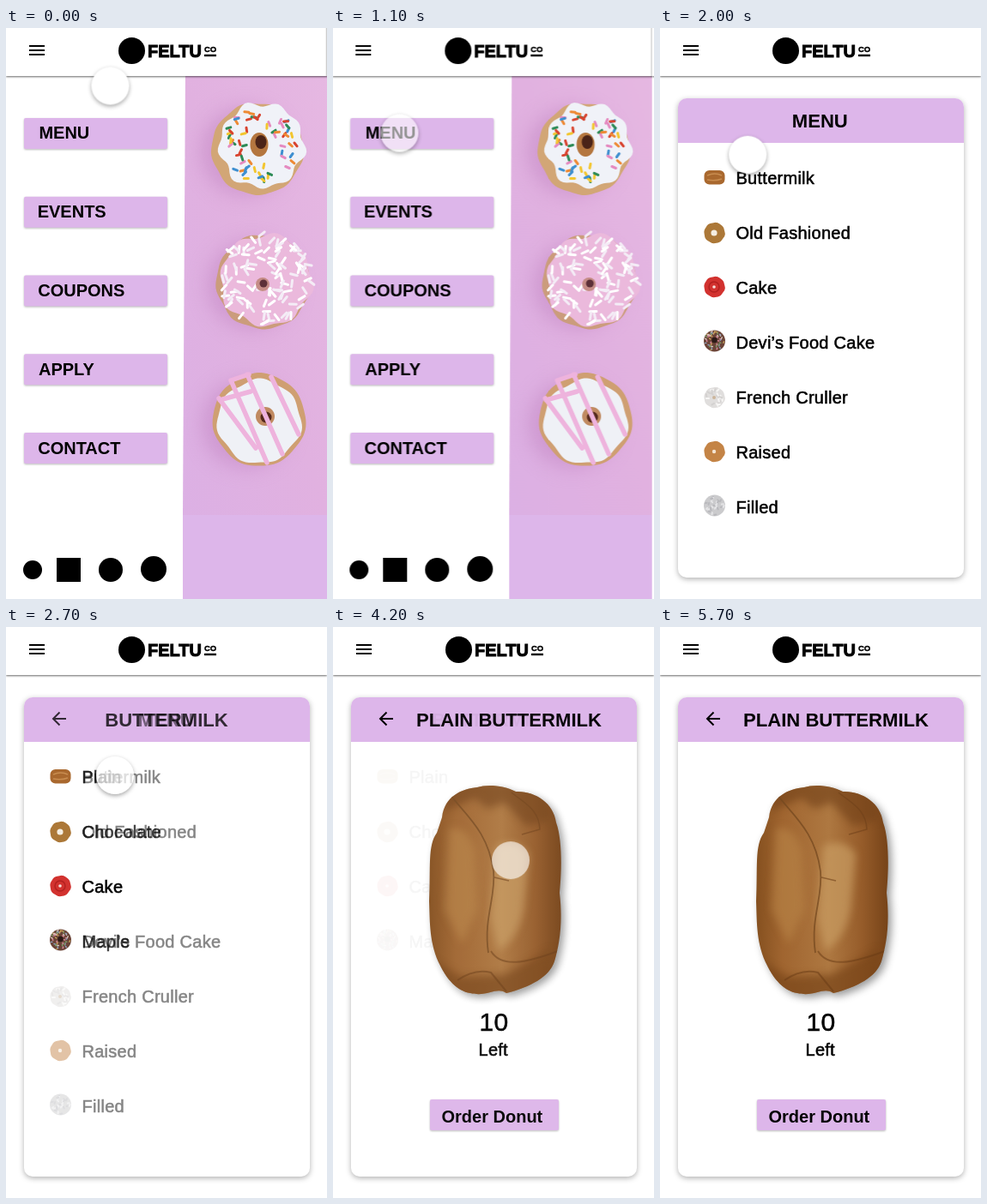
Animation, 374 px wide and 666 px high, one loop 5.8 s. Source, as an HTML page:

```html
<!DOCTYPE html>
<html lang="en">
<head>
<meta charset="utf-8">
<title>Donut ordering app</title>
<style>
  @property --fill { syntax: "<number>"; inherits: false; initial-value: 1; }
  @property --shade { syntax: "<number>"; inherits: false; initial-value: .35; }
  html, body { margin: 0; width: 100%; height: 100%; overflow: hidden; background: #fff; }
  svg { display: block; position: absolute; left: 0; top: 0; }
  text { font-family: "Liberation Sans", Arial, sans-serif; fill: #000; }
  .bold { font-weight: 700; font-size: 20px; }
  .title { font-weight: 700; font-size: 22.1px; text-anchor: middle; }
  .item { font-size: 20px; letter-spacing: .27px; stroke: #000; stroke-width: .55px; }
  .count { font-size: 30px; }
  .word { font-weight: 700; font-size: 20px; stroke: #000; stroke-width: .9px; }
  .co { font-weight: 700; font-size: 9.5px; stroke: #000; stroke-width: .4px; }
  .bar { filter: drop-shadow(0 1px 1px rgba(0, 0, 0, .6)); }
  .button { fill: #ddb6ea; filter: drop-shadow(0 1.5px 1px rgba(0, 0, 0, .28)); }
  .card { filter: drop-shadow(0 2px 3px rgba(0, 0, 0, .3)); }
  .soft { filter: blur(5px); }
  .haze { filter: blur(11px); }
  .cast { filter: drop-shadow(4px 4px 5px rgba(0, 0, 0, .4)); }

  #home, #app, #dim, #menu, #kind, #back, #rows, #detail {
    animation: 5800ms infinite both;
    animation-timing-function: cubic-bezier(.15, .25, 0, 1);
    /* critically damped spring */
    animation-timing-function: linear(0, .007 1.25%, .0265 2.5%, .0902 5%, .264 10%, .442 15%,
      .594 20%, .713 25%, .801 30%, .864 35%, .908 40%, .939 45%, .96 50%, .983 60%, .993 70%,
      .997 80%, 1 100%);
  }
  #home { animation-name: leave; }
  #app { animation-name: enter; }
  #dim { animation-name: dim; }
  #menu { animation-name: menu; }
  #kind { animation-name: kind; }
  #back { animation-name: back; }
  #rows { animation-name: rows; }
  #detail { animation-name: detail; }
  @keyframes leave {
    0%, 18.83% { transform: translateX(0); }
    32.62%, 100% { transform: translateX(-112.2px); }
  }
  @keyframes enter {
    0%, 18.83% { transform: translateX(374px); }
    32.62%, 100% { transform: translateX(0); }
  }
  @keyframes dim {
    0%, 18.83% { opacity: 0; }
    32.62%, 100% { opacity: .27; }
  }
  @keyframes menu {
    0%, 44.14% { opacity: 1; }
    57.93%, 100% { opacity: 0; }
  }
  @keyframes kind {
    0%, 44.14% { opacity: 0; }
    52.76%, 65.43% { opacity: 1; }
    79.22%, 100% { opacity: 0; }
  }
  @keyframes back {
    0%, 44.14% { opacity: 0; }
    52.76%, 100% { opacity: 1; }
  }
  @keyframes rows {
    0%, 65.43% { opacity: 1; }
    79.22%, 100% { opacity: 0; }
  }
  @keyframes detail {
    0%, 65.43% { opacity: 0; }
    79.22%, 100% { opacity: 1; }
  }

  #cursor {
    position: absolute; left: -22px; top: -22px; width: 44px; height: 44px; border-radius: 50%;
    background: rgba(255, 255, 255, var(--fill));
    box-shadow: 0 2px 5px rgba(0, 0, 0, var(--shade));
    animation: move 5800ms linear infinite both, press 5800ms linear infinite both;
  }
  @keyframes move {
    0%, 2% { transform: translate(121.5px, 67.5px); animation-timing-function: ease-in-out; }
    16%, 28% { transform: translate(77.5px, 122.5px); animation-timing-function: ease-in-out; }
    41%, 47% { transform: translate(127px, 173px); animation-timing-function: ease-in-out; }
    54%, 56% { transform: translate(106px, 182px); animation-timing-function: ease-in; }
    60.3% { transform: translate(123.5px, 179px); }
    65.5% { transform: translate(173px, 217px); }
    72.4% { transform: translate(207px, 272px); animation-timing-function: ease-out; }
    77%, 100% { transform: translate(211px, 279px); }
  }
  @keyframes press {
    0%, 15% { --fill: 1; --shade: .35; }
    18.4%, 24% { --fill: .58; --shade: .33; }
    28%, 41% { --fill: 1; --shade: .35; }
    44% { --fill: .6; --shade: .35; }
    46.5% { --fill: .72; --shade: .35; }
    50% { --fill: 1; --shade: .35; }
    56% { --fill: .9; --shade: .35; }
    60% { --fill: .55; --shade: .35; }
    65% { --fill: .55; --shade: .2; }
    72.4% { --fill: .62; --shade: 0; }
    78%, 100% { --fill: 0; --shade: 0; }
  }
</style>
</head>
<body>
<svg width="374" height="666" viewBox="0 0 374 666">
  <defs>
    <linearGradient id="pink" x1="1" y1="0" x2="0" y2="1">
      <stop offset="0" stop-color="#e6b8e2"/>
      <stop offset=".5" stop-color="#e1b1e0"/>
      <stop offset="1" stop-color="#dcb0e4"/>
    </linearGradient>
    <linearGradient id="crust" x1="0" x2="1">
      <stop offset="0" stop-color="#85501f"/>
      <stop offset=".2" stop-color="#a06530"/>
      <stop offset=".55" stop-color="#ae7841"/>
      <stop offset=".8" stop-color="#965c2a"/>
      <stop offset="1" stop-color="#764318"/>
    </linearGradient>
    <clipPath id="loaf"><use href="#loafShape"/></clipPath>
    <clipPath id="panel"><path id="panelShape" d="M209 50H374V568H206Z"/></clipPath>
    <g id="header">
      <rect class="bar" y="-5" width="374" height="61" fill="#fff"/>
      <path d="M27 21h18M27 26h18M27 31h18" stroke="#000" stroke-width="2"/>
      <circle cx="146.5" cy="26.5" r="15.5"/>
      <text class="word" x="165" y="33.5">FELTU</text>
      <text class="co" x="231" y="28">CO</text>
      <path d="M231 32h14" stroke="#000" stroke-width="2.4"/>
    </g>
  </defs>

  <g id="home">
    <rect width="374" height="666" fill="#fff"/>
    <path d="M206 560H374V666H206Z" fill="#ddb6ea"/>
    <use href="#panelShape" fill="url(#pink)"/>
    <g id="photo" clip-path="url(#panel)"></g>
    <g id="links"></g>
    <circle cx="31" cy="632" r="11"/>
    <rect x="59" y="618" width="28" height="28"/>
    <circle cx="122" cy="632" r="14"/>
    <circle cx="172" cy="631" r="15"/>
    <use href="#header"/>
    <rect id="dim" width="374" height="666"/>
  </g>

  <g id="app">
    <rect width="374" height="666" fill="#fff"/>
    <use href="#header"/>
    <g class="card">
      <rect x="21" y="82" width="333" height="559" rx="10" fill="#fff"/>
      <path d="M21 134V92a10 10 0 0 1 10-10H344a10 10 0 0 1 10 10V134Z" fill="#ddb6ea"/>
    </g>
    <path id="back" d="M70 107H55.500M62.500 99.500L55 107l7.500 7.500" fill="none" stroke="#000" stroke-width="2"/>
    <g id="rows"></g>
    <g id="menu"></g>
    <g id="kind"></g>
    <g id="detail">
      <text class="title" x="205" y="116">PLAIN BUTTERMILK</text>
      <path id="loafShape" class="cast" fill="url(#crust)" d="M127 222C130 197 150 189 168 187C180 183 200 185 213 192
        C235 191 257 205 260 228C268 250 266 290 264 310C268 345 264 370 258 390C252 408 230 420 202 427
        C190 419 180 432 160 427C145 425 132 410 125 395C112 370 113 345 112 320C114 280 110 255 121 240Z"/>
      <g clip-path="url(#loaf)">
        <path class="soft" d="M125 180H250L255 225L225 232L200 205L180 212L165 200L130 215Z" fill="#74431a" opacity=".65"/>
        <path class="soft" d="M110 385L150 408L200 405L255 375L265 440H110Z" fill="#784519" opacity=".7"/>
        <path class="soft" d="M190 255Q215 245 228 265L222 330Q215 365 192 378L183 340Z" fill="#c99d63" opacity=".7"/>
        <path class="soft" d="M135 235Q155 230 165 260L168 330L150 370L130 330Z" fill="#b98548" opacity=".6"/>
        <path d="M137 196C153 218 181 238 187 285C190 315 175 340 181 380" fill="none" stroke="#74481f" stroke-width="1.8" opacity=".75"/>
        <path d="M188 292L205 296M208 193C222 205 240 212 241 236L220 242" fill="none" stroke="#704119" stroke-width="1.6" opacity=".6"/>
        <path d="M184 378C196 398 225 392 262 378M145 412Q165 398 184 403L202 425" fill="none" stroke="#693b15" stroke-width="2" opacity=".5"/>
      </g>
      <text class="item count" x="187.500" y="471" text-anchor="middle">10</text>
      <text class="item" x="169.500" y="500">Left</text>
      <rect class="button" x="113" y="551" width="150" height="36" rx="2"/>
      <text class="bold" x="126.500" y="578">Order Donut</text>
    </g>
  </g>
</svg>
<div id="cursor"></div>

<script>
  const put = (id, ...parts) => document.getElementById(id).innerHTML = parts.flat().join("");
  const text = (cls, x, y, s) => `<text class="${cls}" x="${x}" y="${y}">${s}</text>`;
  const disc = (x, y, r, fill) => `<circle cx="${x}" cy="${y}" r="${r}" fill="${fill}"/>`;
  const oval = (x, y, rx, ry, fill) => `<ellipse cx="${x}" cy="${y}" rx="${rx}" ry="${ry}" fill="${fill}"/>`;
  const times = (n, make) => Array.from({ length: n }, (_, i) => make(i));

  let seed = 7;
  const rnd = () => (seed = seed * 16807 % 2147483647) / 2147483647;

  // Round shape with a wavy rim
  function blob(cx, cy, r, wave, lobes, fill) {
    const points = times(90, i => {
      const a = i * Math.PI / 45;
      const d = r + wave * (Math.sin(lobes * a) + .5 * Math.sin((lobes - 3) * a + 1));
      return (cx + d * Math.cos(a)).toFixed(1) + "," + (cy + d * Math.sin(a)).toFixed(1);
    });
    return `<polygon points="${points.join(" ")}" fill="${fill}"/>`;
  }

  // Short strokes scattered over a ring
  function strew(n, cx, cy, inner, outer, len, width, colors) {
    return times(n, i => {
      const a = rnd() * 2 * Math.PI, d = Math.sqrt(inner ** 2 + rnd() * (outer ** 2 - inner ** 2));
      const b = rnd() * Math.PI, dx = len * Math.cos(b), dy = len * Math.sin(b);
      const x = cx + d * Math.cos(a) - dx / 2, y = cy + d * Math.sin(a) - dy / 2;
      return `<path d="M${x.toFixed(1)} ${y.toFixed(1)}l${dx.toFixed(1)} ${dy.toFixed(1)}"
        stroke="${colors[i % colors.length]}" stroke-width="${width}" stroke-linecap="round"/>`;
    });
  }

  const shadow = (x, y) => `<circle class="haze" cx="${x}" cy="${y}" r="52" fill="#c083c0" opacity=".5"/>`;
  const candy = ["#d8432f", "#f3c62f", "#3e8fd0", "#2e8b57", "#e58ac0", "#ee8a35"];

  put("photo",
    shadow(279, 144), blob(293, 141, 53.5, .8, 9, "#d2a676"),
    blob(298, 137, 49, 2.6, 9, "#f0f2f8"),
    strew(62, 296, 136, 18, 43, 5, 3, candy),
    oval(295, 136, 10.5, 14, "#b4763f"), oval(297, 133, 6.5, 8, "#4b2418"),

    shadow(286, 300), blob(300, 296, 55, 1, 9, "#cb9c7c"),
    blob(303, 294, 53, 2.4, 8, "#ebb9dc"),
    strew(105, 302, 293, 13, 54, 8, 3, ["#fff", "#f4ecf6"]),
    disc(299, 299, 8, "#c58c86"), disc(300, 298, 4.5, "#5d3038"),

    shadow(280, 462), blob(295, 457, 54, .7, 7, "#cf9f72"),
    blob(295, 459, 48.5, 1.5, 7, "#eff1f6"),
    disc(302, 453, 11, "#c08a61"), disc(303, 454, 6.5, "#54291c"),
    `<path d="M248 432L291 490M262 411L304 507M281 404L322 497M309 407L341 474M249 434L285 424M262 411L283 404"
      fill="none" stroke="#eeb3dd" stroke-width="5.500" stroke-linecap="round"/>`);

  put("links", ["MENU", "EVENTS", "COUPONS", "APPLY", "CONTACT"].map((s, i) =>
    `<rect class="button" x="21" y="${105 + 91.75 * i}" width="167" height="36" rx="2"/>`
      + text("bold", [38.4, 36.7, 37.2, 38, 37.2][i], 129.3 + 92 * i, s)));

  const row = (s, i) => s && text("item", 88.5, 182 + 64 * i, s);
  const ring = (y, fill, hole, r = 3) => blob(63.5, y, 12.1, .2, 8, fill) + disc(63, y, r, hole);

  put("rows",
    `<rect x="51.500" y="166" width="24" height="16.500" rx="6" fill="#a9682e"/>
     <path d="M55 172q9-4 17 0M55 177q9 2 17-1" fill="none" stroke="#c98d50" stroke-width="1.500"/>`,
    ring(239, "#ac7838", "#f5eee2", 3.6),
    ring(302, "#d2322f", "#f5dfdb", 1.8),
    `<circle cx="63" cy="302" r="6" fill="none" stroke="#b3201f" stroke-width="1.500"/>`,
    disc(63.5, 365, 12.5, "#6b4438"),
    strew(44, 63.5, 365, 4, 11.5, 1.6, 1.4, ["#d9899c", "#c9a15a", "#8b9bb5", "#d8c9c0", "#7a9a67"]),
    disc(63.5, 364, 3.2, "#2c1a17"),
    row("Cake", 2));

  put("menu",
    ring(431, "#e0dedd", "#cbb59b", 2), strew(18, 63, 431, 4, 10, 3, 2, ["#f6f5f4", "#d3d1d0"]),
    ring(494, "#c48446", "#f4e4d2", 2.2),
    disc(63.5, 557, 12.5, "#cbcbcd"), strew(28, 63.5, 557, 0, 11, 2, 2, ["#e4e4e6", "#b9b9bd"]),
    text("title", 186.3, 116, "MENU"),
    ["Buttermilk", "Old Fashioned", "", "Devi’s Food Cake", "French Cruller", "Raised", "Filled"].map(row));

  put("kind",
    text("title", 187, 116, "BUTTERMILK"),
    ["Plain", "Chocolate", "", "Maple"].map(row));
</script>
</body>
</html>
```
